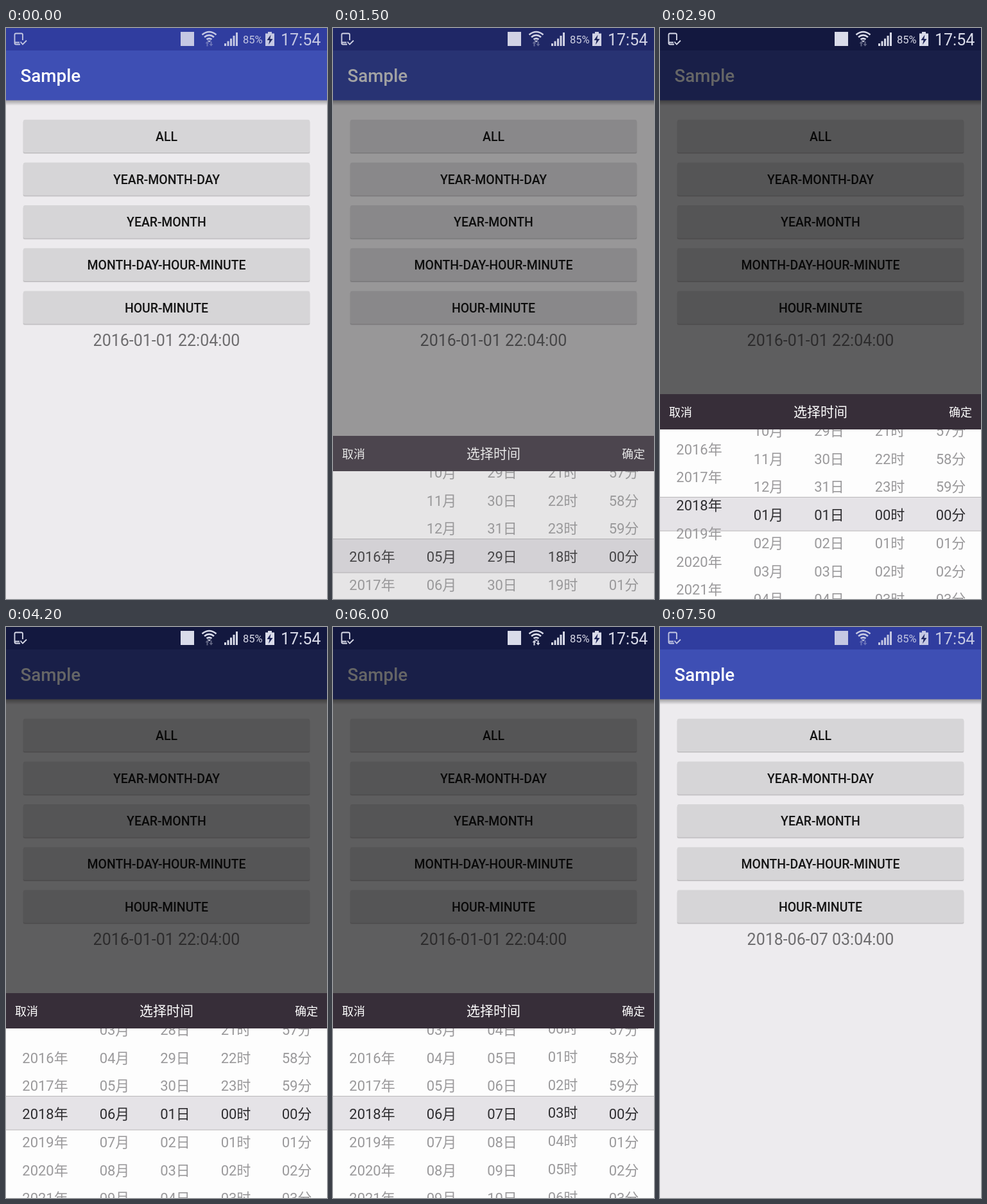
Recreate the animation shown at these times as an HTML page. Size 500 by 889 pixels, loop 8000 ms.

```html
<!DOCTYPE html>
<html lang="zh-CN">
<head>
<meta charset="utf-8">
<title>Date picker</title>
<style>
  html, body { margin: 0; width: 100%; height: 100%; overflow: hidden; background: #edebee; }
  svg { display: block; width: 100vw; height: 100vh; }
  text { font-family: Roboto, "Noto Sans CJK SC", "Noto Sans CJK", sans-serif; }
  .mid { text-anchor: middle; }
  .label { font-size: 19.44px; font-weight: 500; fill: #141414; }
  .wheel text { font-size: 22px; text-anchor: middle; }
  .bar text { fill: #fff; font-size: 18px; }
</style>
</head>
<body>
<svg viewBox="0 0 500 889">
  <defs>
    <linearGradient id="shade" x2="0" y2="1">
      <stop offset="0" stop-opacity=".34"/>
      <stop offset="1" stop-opacity="0"/>
    </linearGradient>
    <clipPath id="window"><rect y="625" width="500" height="264"/></clipPath>
  </defs>

  <rect width="500" height="889" fill="#edebee"/>
  <rect y="112" width="500" height="9" fill="url(#shade)"/>
  <rect y="35" width="500" height="77.5" fill="#3e4fb4"/>
  <rect width="500" height="35" fill="#303d9f"/>
  <text x="22.5" y="84" font-size="27.8" font-weight="500" fill="#fff">Sample</text>
  <g id="buttons"></g>
  <text id="date" class="mid" x="250" y="495" font-size="25" fill="#6e6d6f"></text>

  <rect id="dim" width="500" height="889"/>

  <!-- status icons stay above the dimming layer -->
  <g id="status" fill="#e2e3f0">
    <g fill="none" stroke="#e2e3f0" stroke-width="1.8">
      <path d="M26 19V10.5q0-2-2-2h-8.500q-2 0-2 2v13q0 2 2 2H22M14 22.500h7"/>
      <path d="M22.500 21.500l3.500 4 6-6"/>
    </g>
    <rect x="272" y="6" width="21" height="22"/>
    <g fill="none" stroke="#e2e3f0" stroke-width="2.6">
      <path d="M305.500 10.500q11-9 22 0M309 14.200q7.500-6 15 0M312.500 17.800q4-3 8 0"/>
    </g>
    <path d="M313.500 19.500h6l-3 2.800z"/>
    <path id="arrows" d="M310.500 24l3-3.500 3 3.500h-2v4.500h-2V24zM316.500 25h2v-4h2v4h2l-3 3.500z"/>
    <path d="M340 24h3v4h-3zM344.500 20.500h3V28h-3zM349 16.500h3V28h-3zM353.500 12h3v16h-3zM358 7h3v21h-3z"/>
    <text x="369" y="24" font-size="16.500">85%</text>
    <path d="M408 6h6v2.500h4V28h-14V8.500h4z"/>
    <path d="M412.500 10.500l-6 8.500h4l-1.500 7 6.500-9h-4.200z" fill="#1d2458"/>
    <text x="428" y="27" font-size="25">17:54</text>
  </g>

  <g id="sheet">
    <rect y="625" width="500" height="264" fill="#fdfdfd"/>
    <rect y="730" width="500" height="53.5" fill="#b9b7ba"/>
    <rect y="731" width="500" height="51.5" fill="#e5e3e7"/>
    <g id="wheels" clip-path="url(#window)"></g>
    <g class="bar">
      <rect id="bar" y="570" width="500" height="55"/>
      <rect id="press" x="435" y="570" width="65" height="55" fill-opacity=".16"/>
      <text x="14" y="605">取消</text>
      <text class="mid" x="250" y="605" style="font-size:21px">选择时间</text>
      <text x="450" y="605">确定</text>
    </g>
  </g>
</svg>
<script>
const LOOP = 8000, STEP = 100;
const ROW = 43.75, BASELINE = 766, SHEET = 319, DIM = 0.6;
const $ = id => document.getElementById(id);
const clamp = v => Math.min(1, Math.max(0, v));
const pad = n => String(n).padStart(2, "0");

function add(parent, name, attrs, text = "") {
  const node = document.createElementNS("http://www.w3.org/2000/svg", name);
  for (const key in attrs) node.setAttribute(key, attrs[key]);
  node.textContent = text;
  return parent.appendChild(node);
}

["ALL", "YEAR-MONTH-DAY", "YEAR-MONTH", "MONTH-DAY-HOUR-MINUTE", "HOUR-MINUTE"].forEach((label, i) => {
  const y = 142.7 + i * 66.7, g = $("buttons");
  const box = { x: 27, width: 446, height: 51.3, rx: 2.5 };
  add(g, "rect", { ...box, x: 26.5, width: 447, y: y + 1.8, "fill-opacity": 0.1 });
  add(g, "rect", { ...box, y: y + 1, "fill-opacity": 0.13 });
  add(g, "rect", { ...box, y, fill: "#d6d5d7" });
  add(g, "text", { class: "mid label", x: 250, y: y + 33.3 }, label);
});

// scroll tracks: [ms, rows scrolled] pairs
const wheels = [
  { x: 61, unit: "年", track: [[2500, 0], [2600, .5], [2700, 1.2], [2800, 1.9], [2900, 2.34], [3000, 2.4], [3100, 2.2], [3300, 2]] },
  { x: 169, unit: "月", track: [[3400, 0], [3500, .7], [3700, 3], [3900, 4.7], [4000, 5]] },
  { x: 263.5, unit: "日", track: [[4200, 0], [4400, 1.3], [4700, 4.3], [4900, 5.6], [5100, 6]] },
  { x: 358, unit: "时", track: [[5300, 0], [5500, .8], [5700, 2.2], [5900, 3.12], [6000, 3.035], [6200, 3]] },
  { x: 453, unit: "分", track: [[6200, 0], [6400, 1.1], [6600, 2.9], [6800, 3.9], [6900, 4]] }
];
for (const w of wheels) {
  const g = add($("wheels"), "g", { class: "wheel" });
  w.cells = Array.from({ length: 9 }, () => add(g, "text", { x: w.x }));
}

function along(track, t) {
  const i = track.findIndex(p => p[0] > t);
  if (i === 0) return track[0][1];
  if (i < 0) return track[track.length - 1][1];
  const [t0, a] = track[i - 1], [t1, b] = track[i];
  return a + (b - a) * (t - t0) / (t1 - t0);
}

function drawWheel(w, pos, low, high, cyclic) {
  const mid = Math.round(pos), size = high - low + 1;
  w.cells.forEach((cell, i) => {
    const index = mid + i - 4;
    const shown = cyclic || (index >= 0 && index < size);
    const value = low + ((index % size) + size) % size;
    cell.textContent = shown ? pad(value) + w.unit : "";
    cell.setAttribute("y", BASELINE + (index - pos) * ROW);
    cell.setAttribute("fill", index === mid ? "#2e2d30" : "#9a999b");
  });
}

function drawWheels(t) {
  const pos = wheels.map(w => along(w.track, t));
  const first = Math.round(pos[0]) === 0;   // the first year starts on 29 May, 18:00
  const year = 2016 + Math.round(pos[0]), month = 1 + Math.round(pos[1]);
  const days = new Date(year, month, 0).getDate();
  const ranges = [
    [2016, 2026],
    first ? [5, 12] : [1, 12],
    first ? [29, 31] : [1, days],
    first ? [18, 23] : [0, 23],
    [0, 59]
  ];
  wheels.forEach((w, i) => drawWheel(w, pos[i], ...ranges[i], i > 0));
}

function draw(t) {
  const enter = clamp((t - 1308) / 350), exit = clamp((t - 7000) / 258);
  const shift = SHEET * ((1 - enter) ** 2 + exit ** 2);
  const stay = clamp(1 - exit * 1.25);
  const shown = clamp(enter * 1.1) * stay;
  const mix = (a, b) => Math.round(b + (a - b) * stay);

  $("sheet").setAttribute("transform", `translate(0 ${shift})`);
  $("sheet").setAttribute("visibility", shift < SHEET ? "visible" : "hidden");
  $("sheet").setAttribute("opacity", 0.5 + 0.5 * enter);
  $("bar").setAttribute("fill", `rgb(${mix(55, 143)},${mix(46, 143)},${mix(57, 143)})`);
  $("press").setAttribute("opacity", t >= 7000 ? 1 : 0);
  $("dim").setAttribute("opacity", DIM * shown);
  $("status").setAttribute("opacity", 0.84 + 0.12 * shown);
  $("arrows").setAttribute("opacity", t >= 5900 && t < 6200 ? 1 : 0.4);
  $("date").textContent = t < 7100 ? "2016-01-01 22:04:00" : "2018-06-07 03:04:00";
  drawWheels(t);
}

function frame() {
  draw(Math.floor(performance.now() % LOOP / STEP) * STEP);
  requestAnimationFrame(frame);
}
frame();
</script>
</body>
</html>
```
